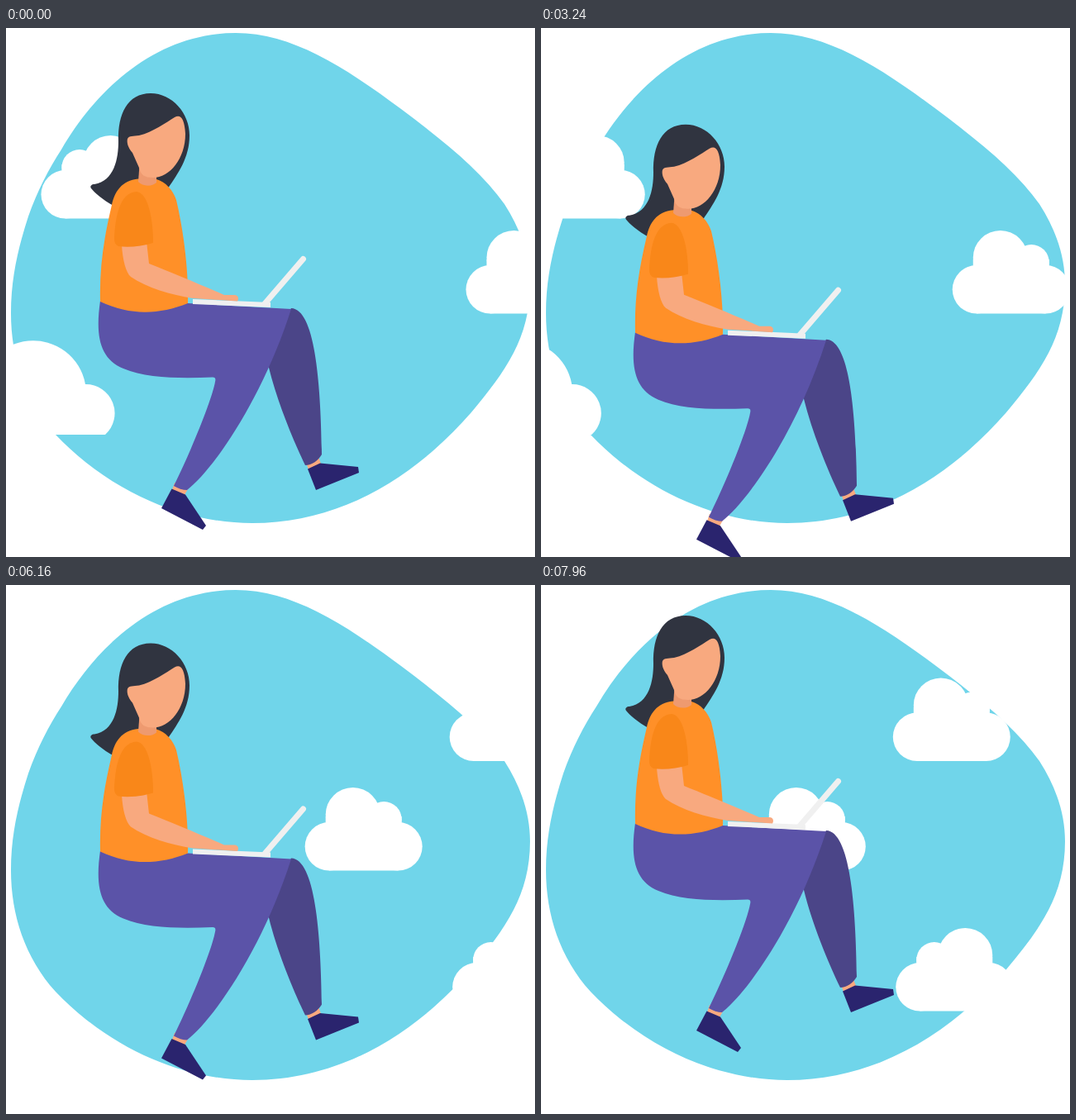
Animation, 640 px wide and 640 px high, one loop 8000 ms. Source, as an HTML page:

```html
<!DOCTYPE html>
<html lang="en">
<head>
<meta charset="utf-8">
<title>Working in the clouds</title>
<style>
  html, body { margin: 0; width: 100%; height: 100%; overflow: hidden; background: #fff; }
  svg { display: block; width: 100vw; height: 100vh; }
</style>
</head>
<body>
<svg viewBox="0 0 640 640">
  <defs>
    <g id="cloud" fill="#fff">
      <circle cx="29.2" cy="71.3" r="29.2"/>
      <circle cx="112.8" cy="71.3" r="29.2"/>
      <circle cx="58" cy="33" r="33"/>
      <circle cx="95.5" cy="38.5" r="21.5"/>
      <rect x="25" y="35" width="92" height="25"/>
      <rect x="29.2" y="42.1" width="83.6" height="58.4"/>
    </g>
  </defs>

  <path fill="#70d5ea" d="M278 6C345 6 408 46 478 98C530 137 575 173 603 213C624 246 634 278 634 310
    C634 375 604 416 563 465C495 543 405 599 298 599C215 599 127 562 60 492C23 451 6 399 6 345
    C6 300 16 262 27 228C38 197 52 170 67 147C112 70 185 6 278 6Z"/>

  <g id="sky">
    <use href="#cloud" transform="translate(184.5 130) scale(-1 1)"/>
    <use href="#cloud" transform="translate(556.5 245)"/>
    <use href="#cloud" transform="translate(731.5 112.5)"/>
    <use href="#cloud" transform="translate(877 415) scale(-1 1)"/>
    <path fill="#fff" d="M-31 443A64 64 0 0 1 96 431A35 35 0 0 1 120 492H-31Z"/>
  </g>

  <g id="woman">
    <!-- back leg -->
    <path fill="#f8a97f" d="M363 526L378 519L381 527L366 534Z"/>
    <path fill="#2a246e" d="M365 533.5L380 526.5L426 531L427 538L375 559Z"/>
    <path fill="#4b4588" d="M345 339C374 340 381 430 382 516C378 523 370 529 362 529C348 500 328 452 318 411L310 390Z"/>
    <!-- front leg -->
    <path fill="#f8a97f" d="M204 550L221 556L216 565L201 559Z"/>
    <path fill="#2a246e" d="M200.500 557.500L217 564.500L242 602L238 607L188 581Z"/>
    <path fill="#5b53a8" d="M114 330C108 372 113 400 142 412C170 424 212 424 250 422.500
      C253 422.500 254 424 253 428C250 446 228 503 203 554C208 557 214 559 219 559
      C250 535 310 450 345 340L220 333L170 325Z"/>
    <!-- head and body -->
    <path fill="#303440" d="M175 79C201 79 222 103 222 130C222 157 208 176 196 194L180 215H130
      C117 208 107 199 103 194C101 191 104 189 107 189C131 185 136 158 136 137C135 104 147 79 175 79Z"/>
    <path fill="#ff9028" d="M160 182.500C140 184 131 199 128 214C118 256 113 290 114 331
      C150 348 185 347 220 333C221 300 216 250 206 208C202 196 193 186 182 183Z"/>
    <path fill="#ee9a70" d="M161.500 166L160 186C165 192 177 192 182 187V176Z"/>
    <path fill="#f8a97f" d="M161 130C178 126 194 114 204 108C211 104 216 109 217 128
      C217 158 198 181 178 181C168 181 163 178 161 169L153 151C147 144 146 138 147 134C149 130 154 131 161 130Z"/>
    <!-- laptop and arm -->
    <path fill="#f0f0f0" d="M226 328L320 332V338L226 334Z"/>
    <path fill="none" stroke="#f0f0f0" stroke-width="7" stroke-linecap="round" d="M313.500 333L359.500 279.500"/>
    <path fill="#f8a97f" d="M140 262C141 280 145 296 151 301C170 314 200 323 226 327L280 330.500
      C282 327 281 323 276 323H264C230 308 200 296 173 285L170 258Z"/>
    <path fill="#f98719" d="M158 198C170 199 178 225 178 260C165 264 148 266 136 264C132 262 131 259 131 254C132 230 137 199 158 198Z"/>
  </g>
</svg>
<script>
  const LOOP = 8000, STEP = 112;
  const sky = document.getElementById('sky');
  const woman = document.getElementById('woman');

  const ease = (t, from, to) => {
    const p = Math.min(1, Math.max(0, (t - from) / (to - from)));
    return (1 - Math.cos(Math.PI * p)) / 2;
  };
  const bob = t => 38.4 * ease(t, 20, 3560) - 81.5 * ease(t, 3560, 8300);
  const drift = t => 435 * (Math.cos(1.58e-4 * (t + 80)) - 1);

  // The picture advances in steps that land on a 20 ms grid.
  const hold = t => Math.floor((Math.floor(t / 20) * 20 + 10) / STEP) * STEP;

  function draw() {
    const t = hold(performance.now() % LOOP);
    sky.setAttribute('transform', `translate(${drift(t).toFixed(2)} 0)`);
    woman.setAttribute('transform', `translate(0 ${bob(t).toFixed(2)})`);
    requestAnimationFrame(draw);
  }
  draw();
</script>
</body>
</html>
```
